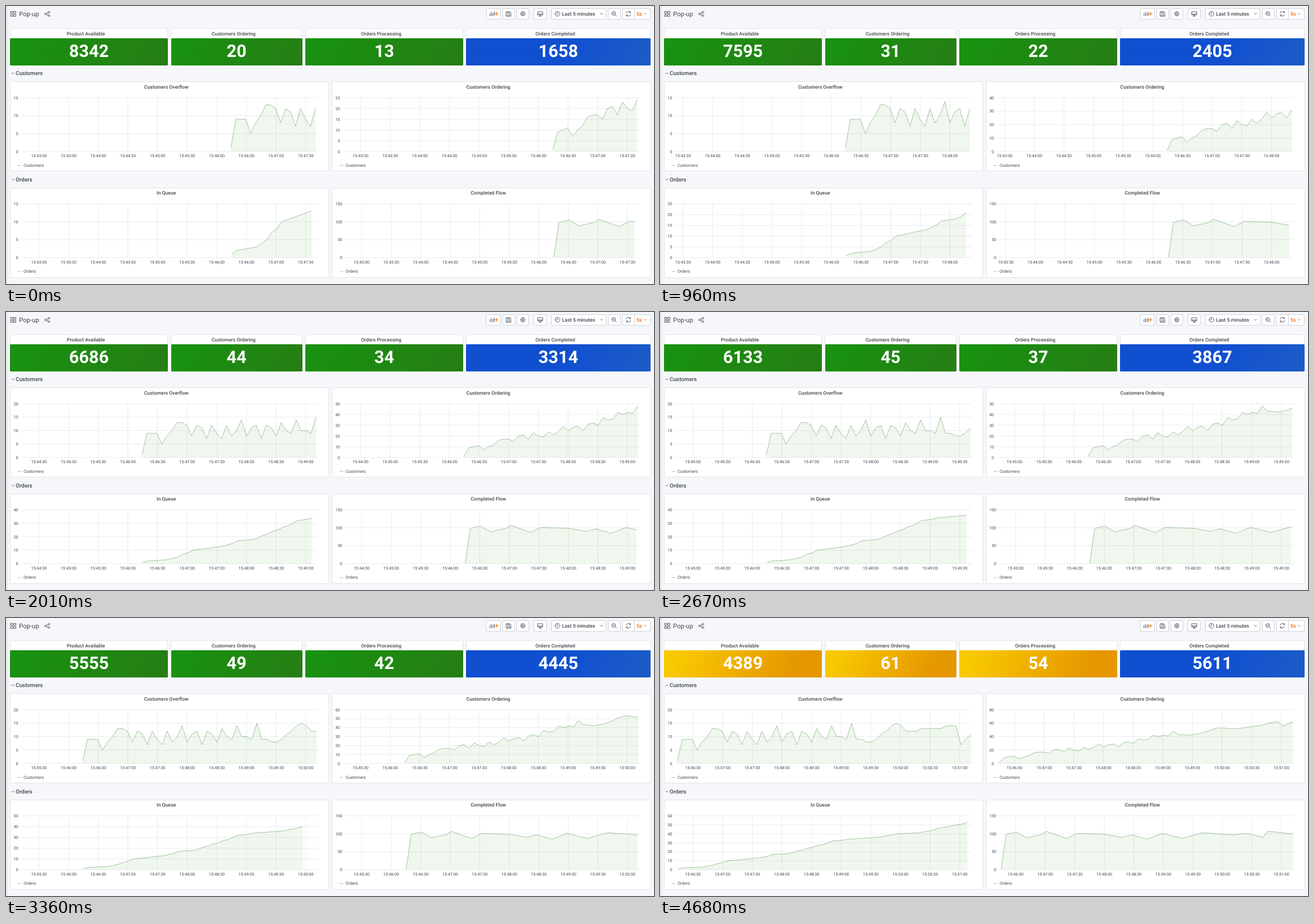
Animation of 1141 by 491 pixels, one loop 4710 ms. Source, as an HTML page:

```html
<!DOCTYPE html>
<html lang="en">
<head>
<meta charset="utf-8">
<title>Pop-up dashboard</title>
<style>
  html, body { margin: 0; width: 100%; height: 100%; overflow: hidden; background: #f6f7fa; }
  #stage { position: absolute; left: 0; top: 0; width: 1141px; height: 491px; overflow: hidden;
    font-family: Roboto, "Open Sans", sans-serif; color: #41464e;
    background: linear-gradient(90deg, #e3e5e9, #f6f7fa 5px); }
  svg { position: absolute; left: 0; top: 0; }
  text { font-family: Roboto, "Open Sans", sans-serif; fill: #41464e; text-rendering: geometricPrecision; }
  .stat { position: absolute; top: 57px; height: 48px; border-radius: 1.5px; color: #fff;
    font-size: 30.5px; font-weight: 700; line-height: 48px; text-align: center; text-rendering: geometricPrecision; }
  .green { background: linear-gradient(120deg, #179310, #267d14); }
  .yellow { background: linear-gradient(120deg, #f9c900 10%, #e59700 80%); }
  .blue { background: linear-gradient(120deg, #104fd0 50%, #1c5cc6); }
  .axis text { font-size: 7.2px; }
  .title { font-size: 8.6px; font-weight: 500; text-anchor: middle; }
  .row { font-size: 9.8px; font-weight: 500; }
  .box { fill: #fff; stroke: #e1e4e9; stroke-width: 1; }
  .button { fill: #fff; stroke: #cfd3da; stroke-width: 1; }
  .icon { fill: none; stroke: #565c64; stroke-width: 1; stroke-linecap: round; stroke-linejoin: round; }
  .grid { stroke: #e9ebee; stroke-width: 1; fill: none; }
  .line { stroke: #5b9a53; stroke-opacity: .62; stroke-width: .9; fill: none; stroke-linejoin: round; }
  .area { fill: #56a040; fill-opacity: .09; }
</style>
</head>
<body>
<div id="stage"></div>
<script>
const FRAME = 30, FRAMES = 157, SAMPLES = 60;
const stage = document.getElementById('stage');

// Interpolate through sorted key points [x, y]
function at(points, x) {
  const i = points.findIndex(p => p[0] >= x);
  if (i < 0) return points[points.length - 1][1];
  if (i === 0) return points[0][1];
  const [x0, y0] = points[i - 1], [x1, y1] = points[i];
  return y0 + (y1 - y0) * (x - x0) / (x1 - x0);
}
const sample = f => Array.from({ length: SAMPLES }, (_, i) => [i, f(i)]);

const queueKeys = [[0, 1], [1, 2], [5, 3], [10, 10], [16, 13], [19, 17], [22, 18], [26, 24],
  [31, 32], [34, 34], [40, 36], [44, 40], [47, 40.5], [52, 46], [58, 53]];
const levelKeys = [[0, 1], [1, 9], [3, 8.5], [4, 5], [7, 13], [9, 12], [11, 10.5], [17, 9], [20, 11],
  [25, 10], [32, 11], [34, 9], [35, 15], [36, 9], [39, 8], [44, 15], [46, 12], [56, 14], [57, 7], [59, 11]];
const swingKeys = [[9, 0], [10, 3], [31, 3], [33, 0]];
const flowKeys = [[0, 1], [1, 98], [3, 105], [5, 89], [8, 98], [9, 107], [13, 87], [15, 101], [21, 98],
  [24, 90], [26, 97], [29, 85], [32, 101], [36, 87], [40, 103], [46, 97], [49, 101], [52, 90], [53, 107], [58, 100]];

const queueAt = i => Math.floor(at(queueKeys, i));
const overflowAt = i => Math.round(at(levelKeys, i) - at(swingKeys, i) * Math.cos(2 * Math.PI * (i - 10) / 2.8));
// Customers ordering are those waiting plus the queue two samples earlier
const orderingAt = i => overflowAt(i) + (i < 2 ? 0 : queueAt(i - 2));
const flowAt = i => Math.round(at(flowKeys, i));

// The queue only reports when it changes
const queue = sample(queueAt).filter(([i, v]) => i === 0 || v !== queueAt(i - 1));

const charts = [
  { title: 'Customers Overflow', legend: 'Customers', x: 7, y: 0, left: 28, labelX: 21.5,
    tick: 58, gap: 52.2, start: 396, step: 8.76, last: 17, data: sample(overflowAt) },
  { title: 'Customers Ordering', legend: 'Customers', x: 574, y: 0, left: 594, labelX: 588,
    tick: 624.3, gap: 52.2, start: 962.7, step: 8.76, last: 17, data: sample(orderingAt) },
  { title: 'In Queue', legend: 'Orders', x: 7, y: 187.5, left: 28, labelX: 21.5,
    tick: 58, gap: 52.2, start: 397.5, step: 8.78, last: 16, data: queue },
  { title: 'Completed Flow', legend: 'Orders', x: 574, y: 187.5, left: 596.5, labelX: 592,
    tick: 626.2, gap: 52, start: 964.6, step: 8.86, last: 16, data: sample(flowAt) }
];

// Counter key points: refresh, completed, ordering, processing
const readings = [[0, 1658, 20, 13], [8, 2405, 31, 22], [18, 3314, 44, 34], [24, 3867, 45, 37],
  [30, 4445, 49, 42], [36, 5018, 56, 46], [42, 5611, 61, 54]];
const counter = col => {
  const keys = readings.map(r => [r[0], r[col]]);
  return k => Math.round(at(keys, k));
};
const completed = counter(1);
const load = v => v >= 50 ? 'yellow' : 'green';

const stats = [
  { title: 'Product Available', x: 7, w: 278, value: k => 10000 - completed(k), tone: v => v < 5000 ? 'yellow' : 'green' },
  { title: 'Customers Ordering', x: 290.5, w: 231, value: counter(2), tone: load },
  { title: 'Orders Processing', x: 527, w: 278, value: counter(3), tone: load },
  { title: 'Orders Completed', x: 810, w: 325, value: completed, tone: () => 'blue' }
];

const text = (x, y, s, attrs = '') => `<text x="${x}" y="${y}" ${attrs}>${s}</text>`;
const box = (x, y, w, h, cls = 'box') =>
  `<rect class="${cls}" x="${x + .5}" y="${y + .5}" width="${w - 1}" height="${h - 1}" rx="1.5"/>`;
const icon = (d, attrs = '') => `<path class="icon" d="${d}" ${attrs}/>`;
const circle = (x, y, r) => `M${x - r} ${y}a${r} ${r} 0 1 0 ${2 * r} 0a${r} ${r} 0 1 0 ${-2 * r} 0`;

function toolbar() {
  const buttons = [[845, 26], [874, 22], [899, 22], [929, 23], [960, 97], [1060, 22], [1085, 50]];
  const teeth = Array.from({ length: 8 }, (_, i) => {
    const c = Math.cos(i * Math.PI / 4), s = Math.sin(i * Math.PI / 4);
    return `M${910 + 3.4 * c} ${13.7 + 3.4 * s}L${910 + 4.4 * c} ${13.7 + 4.4 * s}`;
  }).join('');
  return buttons.map(([x, w]) => box(x, 4, w, 20, 'button')).join('') +
    icon('M8.5 9.5h3.4v3.4h-3.4zM13.9 9.5h3.4v3.4h-3.4zM8.5 14.9h3.4v3.4h-3.4zM13.9 14.9h3.4v3.4h-3.4z') +
    text(23, 18, 'Pop-up', 'font-size="11.2"') +
    icon(circle(69.8, 14, 1.6) + circle(75.6, 11, 1.6) + circle(75.6, 17, 1.6) + 'M71.3 13.2l2.8-1.5M71.3 14.8l2.8 1.5') +
    icon('M852 17.5v-4M854.5 17.5v-6.5M857 17.5v-5M859.5 17.5v-7', 'stroke-width="1.5"') +
    icon('M863.5 11v5.4M860.8 13.7h5.4', 'style="stroke:#f08a24;stroke-width:1.5"') +
    icon('M881 10h6l2 2v6h-8zM883 10v2.5h3.5v-2.5M883 18v-3h4v3') +
    icon(circle(910, 13.7, 3.4) + circle(910, 13.7, 1.3) + teeth) +
    icon('M936.5 10h8.5v5.8h-8.5zM936.5 14h8.5M940.7 16v2M938.5 18h4.5') +
    icon(circle(971, 13.7, 4.2) + 'M971 11v2.8h-2') +
    text(979, 16.8, 'Last 5 minutes', 'font-size="8.8" font-weight="500"') +
    icon('M1046.5 12.8l2 2 2-2') +
    icon(circle(1070, 13, 3.3) + 'M1072.5 15.6l2.4 2.4M1068.6 13h2.8') +
    icon('M1092 12.6a4 4 0 0 1 7.2-1.4M1099.6 9.3v2.3h-2.3M1099.8 14.8a4 4 0 0 1-7.2 1.4M1092.2 18.1v-2.3h2.3') +
    '<path d="M1106.5 4v20" stroke="#cfd3da"/>' +
    text(1110, 16.8, '5s', 'font-size="8.9" font-weight="500" style="fill:#ee6a12"') +
    icon('M1123.5 12.8l2 2 2-2', 'style="stroke:#ee6a12"');
}

function frameOf(c) {
  const y = c.y;
  return box(c.x, Math.round(133.3 + y), 562, 159) +
    text(c.x + 275.3, 145.8 + y, c.title, 'class="title"') +
    `<path class="line" d="M${c.x + 13.5} ${281.5 + y}h6.5"/>` +
    text(c.x + 24, 283.7 + y, c.legend, 'font-size="7.3"');
}

const rowTitle = (y, s) => icon(`M10.2 ${y - 4.2}l1.8 1.8 1.8-1.8`) + text(17, y, s, 'class="row"');

// Round axis steps to 1, 2, 2.5, 5 or 10 times a power of ten
function scale(max) {
  const top = max * 1.02, raw = top / 3.62;
  const mag = 10 ** Math.floor(Math.log10(raw)), n = raw / mag;
  const step = mag * (n < 1.5 ? 1 : n < 2.25 ? 2 : n < 3 ? 2.5 : n < 7.5 ? 5 : 10);
  return { step, max: Math.ceil(top / step) * step };
}

const pad = n => String(n).padStart(2, '0');
const clock = s => [s / 3600, s / 60 % 60, s % 60].map(v => pad(Math.floor(v))).join(':');

function plot(c, k) {
  const top = 162 + c.y, base = 257 + c.y, right = c.x + 542;
  const shift = k * c.gap / 6;
  const points = c.data.filter(p => p[0] <= c.last + k);
  const { step, max } = scale(Math.max(...points.map(p => p[1])));
  const yOf = v => base - (base - top) * v / max;
  let grid = '', labels = '';
  for (let v = 0; v <= max; v += step) {
    grid += `M${c.left} ${yOf(v)}H${right}`;
    labels += text(c.labelX, yOf(v) + 2.5, v, 'text-anchor="end"');
  }
  for (let i = 0; i < 20; i++) {
    const x = c.tick + i * c.gap - shift;
    if (x < c.left || x > right) continue;
    grid += `M${x} ${top}V${base}`;
    labels += text(x, 267.4 + c.y, clock(15 * 3600 + 43 * 60 + i * 30), 'text-anchor="middle"');
  }
  const xy = points.map(([i, v]) => [c.start - shift + i * c.step, yOf(v)]);
  const d = 'M' + xy.map(p => p.map(n => n.toFixed(2)).join(' ')).join('L');
  return `<path class="grid" d="${grid}"/>` +
    `<path class="area" d="${d}V${base}H${xy[0][0]}Z"/><path class="line" d="${d}"/>${labels}`;
}

stage.innerHTML = '<svg width="1141" height="491" viewBox="0 0 1141 491">' + toolbar() +
  stats.map(s => box(s.x, 39.5, s.w, 65) + text(s.x + s.w / 2 - 5.3, 51.8, s.title, 'class="title"')).join('') +
  rowTitle(122.3, 'Customers') + rowTitle(310, 'Orders') +
  charts.map(frameOf).join('') + '<g id="plots" class="axis"></g></svg>' +
  stats.map(s => `<div class="stat" style="left:${s.x}px;width:${s.w}px"></div>`).join('');
const plots = document.getElementById('plots');
const tiles = [...document.querySelectorAll('.stat')];

let shown = -1;
function draw(now) {
  const n = Math.floor(now / FRAME) % FRAMES;
  const k = Math.floor(n * 1.345 / 5 + .2);
  if (k === shown) return;
  shown = k;
  plots.innerHTML = charts.map(c => plot(c, k)).join('');
  stats.forEach((s, i) => {
    const v = s.value(k);
    tiles[i].textContent = v;
    tiles[i].className = 'stat ' + s.tone(v);
  });
}
const begin = performance.now();
function tick() {
  draw(performance.now() - begin);
  requestAnimationFrame(tick);
}
tick();
</script>
</body>
</html>
```
